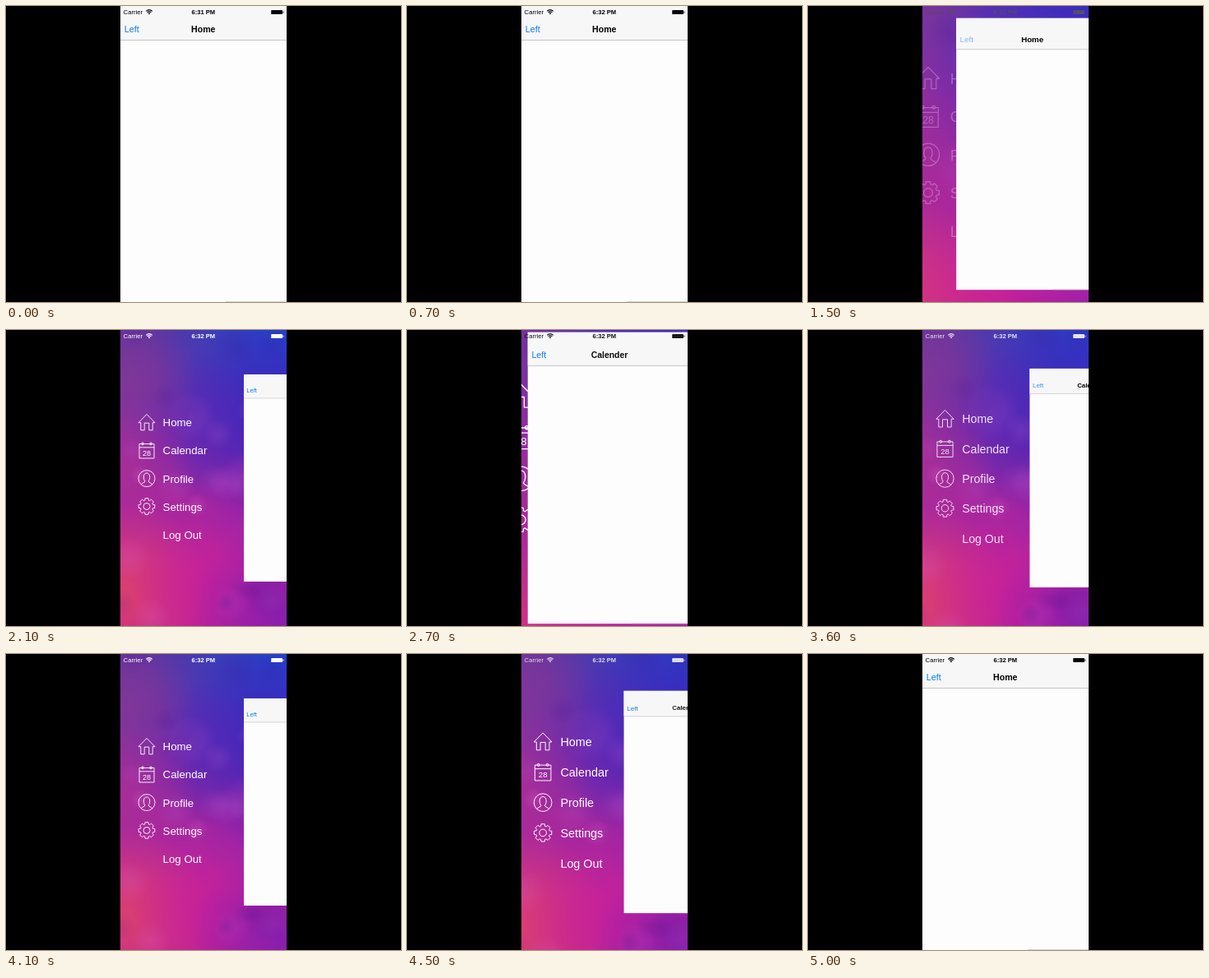
Animation of 480x360 px, one loop 5.1 s. Source, as an HTML page:

```html
<!DOCTYPE html>
<html lang="en">
<head>
<meta charset="utf-8">
<title>Side menu</title>
<style>
  html, body { margin: 0; width: 100%; height: 100%; overflow: hidden; background: #000; }
  svg { display: block; width: 100vw; height: 100vh; }
  text { font-family: "Liberation Sans", Arial, sans-serif; }
  .line { fill: none; stroke: #fff; stroke-width: .9; stroke-linejoin: round; }
</style>
</head>
<body>
<svg viewBox="0 0 480 360">
  <defs>
    <clipPath id="screen"><rect x="139" width="202" height="360"/></clipPath>
    <linearGradient id="sky" x2="0" y2="1">
      <stop offset="0" stop-color="#60349f"/>
      <stop offset=".3" stop-color="#7c2da4"/>
      <stop offset=".55" stop-color="#a1269f"/>
      <stop offset=".8" stop-color="#c0259b"/>
      <stop offset="1" stop-color="#bd2398"/>
    </linearGradient>
    <g id="bar">
      <text x="142.6" y="10.2" font-size="7.7">Carrier</text>
      <g fill="none" stroke="currentColor" stroke-width="1.1">
        <path d="M170.2 6.3Q174 2.9 177.8 6.3M171.6 7.9Q174 5.8 176.4 7.9"/>
      </g>
      <path d="M172.6 8.9Q174 7.8 175.4 8.9L174 10.3Z"/>
      <text class="clock" x="239.8" y="10.2" font-size="7.6" font-weight="700" text-anchor="middle"></text>
      <rect x="322.2" y="4.9" width="13.8" height="5.2" rx=".9"/>
      <rect x="336.5" y="6.4" width="1" height="2.2" rx=".5"/>
    </g>
  </defs>
  <rect width="480" height="360"/>
  <g clip-path="url(#screen)">
    <g id="back"><rect x="139" width="202" height="360" fill="url(#sky)"/></g>
    <g id="menu">
      <g class="line">
        <path d="M161 112.7L171 102.5L181 112.7H178.2V121.8H173.8V113.2H168.2V121.8H163.8V112.7Z"/>
        <path d="M162 138.6H180V156H162ZM162 142.8H180"/>
        <circle cx="166" cy="138.4" r="1.4"/>
        <circle cx="176" cy="138.4" r="1.4"/>
        <circle cx="171" cy="180.6" r="10"/>
        <path d="M164.3 188C165 185.6 168.9 186 168.9 183.8C166.6 181.5 166.3 174 171 174C175.7 174 175.4 181.5 173.1 183.8C173.1 186 177 185.6 177.7 188"/>
        <path id="gear"/>
        <circle cx="171" cy="214.5" r="4"/>
      </g>
      <text x="171" y="152.8" font-size="9" fill="#fff" text-anchor="middle">28</text>
    </g>
    <g id="panel">
      <rect x="139" width="202" height="360" fill="#fdfdfd"/>
      <rect x="139" width="202" height="41" fill="#f7f7f7"/>
      <rect x="139" y="41" width="202" height=".8" fill="#b8b8b8"/>
      <text id="left" x="143.8" y="31.6" font-size="10.8" fill="#0a7cf2">Left</text>
      <g font-size="10.6" font-weight="700" text-anchor="middle">
        <text id="home" x="239.8" y="31.5">Home</text>
        <text id="cal" x="239.8" y="31.5">Calender</text>
      </g>
      <rect x="267" y="359" width="74" height="1" fill="#d8d8dc"/>
    </g>
    <use id="dark" href="#bar" color="#000" fill="#000"/>
    <use id="light" href="#bar" color="#fff" fill="#fff"/>
  </g>
</svg>
<script>
const LOOP = 5100, STEP = 100, SLIDE = 350;
const OPEN = [1373, 3338], CLOSE = [2406, 4400], PRESS = [1100, 3200], MINUTE = 600;
const $ = id => document.getElementById(id);

function add(parent, tag, attrs, text) {
  const el = document.createElementNS("http://www.w3.org/2000/svg", tag);
  for (const k in attrs) el.setAttribute(k, attrs[k]);
  if (text) el.textContent = text;
  return parent.appendChild(el);
}

// Soft colour spots of the blurred backdrop
const defs = document.querySelector("defs");
let spots = 0;
function spot(x, y, r, color, alpha) {
  const id = "spot" + spots++;
  const g = add(defs, "radialGradient", { id });
  add(g, "stop", { offset: 0, "stop-color": color, "stop-opacity": alpha });
  add(g, "stop", { offset: .5, "stop-color": color, "stop-opacity": alpha * .55 });
  add(g, "stop", { offset: 1, "stop-color": color, "stop-opacity": 0 });
  add($("back"), "circle", { cx: x, cy: y, r, fill: `url(#${id})` });
}
[
  [340, 5, 170, "#1f45cc", 1],
  [325, 110, 130, "#3a20bd", .9],
  [235, 120, 90, "#5527b8", .6],
  [140, 60, 90, "#8a3c92", .6],
  [140, 170, 90, "#b03094", .7],
  [142, 320, 110, "#e04468", .85],
  [235, 310, 80, "#c81c9c", .6],
  [335, 345, 110, "#7a1cb4", .8],
  [300, 215, 70, "#9420b0", .6]
].forEach(s => spot(...s));

let seed = 7;
const rnd = () => (seed = seed * 16807 % 2147483647) / 2147483647;
for (let i = 0; i < 34; i++) {
  spot(139 + rnd() * 202, rnd() * 360, 12 + rnd() * 20, i % 2 ? "#e070d8" : "#40108c", .1 + rnd() * .12);
}

// Gear outline with eight teeth
let d = "";
for (let i = 0; i < 8; i++) {
  [[-.3, 7.7], [-.2, 10], [.2, 10], [.3, 7.7]].forEach(([off, r]) => {
    const a = i * Math.PI / 4 + off;
    d += (d ? "L" : "M") + (171 + r * Math.sin(a)).toFixed(2) + " " + (214.5 - r * Math.cos(a)).toFixed(2);
  });
}
$("gear").setAttribute("d", d + "Z");

["Home", "Calendar", "Profile", "Settings", "Log Out"].forEach((name, i) =>
  add($("menu"), "text", { x: 190.6, y: 117.3 + i * 34.15, "font-size": 13.25, fill: "#fff" }, name));

const clamp = v => Math.max(0, Math.min(1, v));

// cubic-bezier(.42, 0, .58, 1)
function ease(t) {
  if (t <= 0 || t >= 1) return clamp(t);
  let lo = 0, hi = 1, u;
  for (let i = 0; i < 24; i++) {
    u = (lo + hi) / 2;
    const x = 1.26 * u * (1 - u) ** 2 + 1.74 * u * u * (1 - u) + u ** 3;
    if (x < t) lo = u; else hi = u;
  }
  return u * u * (3 - 2 * u);
}

const slide = (t, start) => ease((t - start) / SLIDE);
const zoom = (id, s, dx = 0) =>
  $(id).setAttribute("transform", `translate(${240 + dx} 180) scale(${s}) translate(-240 -180)`);
const fade = (id, a) => $(id).setAttribute("opacity", a);

function leftAlpha(t) {
  const i = t < PRESS[1] ? 0 : 1;
  return t < PRESS[i] ? 1 : .2 + .8 * clamp((t - OPEN[i]) / SLIDE);
}

function draw(t) {
  const p = slide(t, OPEN[0]) - slide(t, CLOSE[0]) + slide(t, OPEN[1]) - slide(t, CLOSE[1]);
  const page = slide(t, CLOSE[0]) - slide(t, CLOSE[1]);
  const closing = CLOSE.some(c => t >= c && t < c + SLIDE);
  zoom("back", 1.7 - .7 * p);
  zoom("menu", 1.5 - .5 * p);
  zoom("panel", 1 - .3 * p, 119.7 * p);
  fade("menu", closing ? 1 : p);
  fade("left", leftAlpha(t));
  fade("home", 1 - page);
  fade("cal", page);
  fade("dark", 1 - p);
  fade("light", p);
  document.querySelector(".clock").textContent = t < MINUTE ? "6:31 PM" : "6:32 PM";
}

const begin = performance.now();
function tick() {
  const t = (performance.now() - begin) % LOOP;
  draw(Math.floor(t / STEP) * STEP);
  requestAnimationFrame(tick);
}
tick();
</script>
</body>
</html>
```
